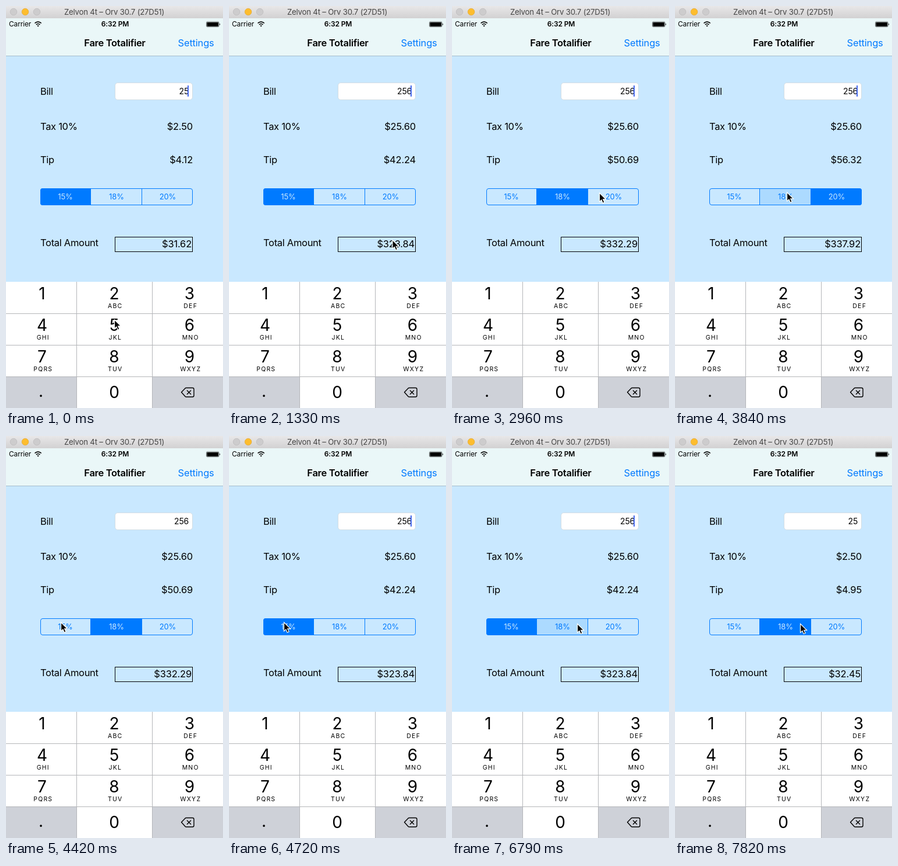
Write an HTML page that moves like this. It is 373 by 688 pixels and loops after 8000 ms.

```html
<!DOCTYPE html>
<html lang="en">
<head>
<meta charset="utf-8">
<title>Fare Totalifier</title>
<style>
  html, body { margin: 0; width: 100%; height: 100%; overflow: hidden; }
  svg { display: block; width: 373px; height: 688px; background: #c9e8ff; }
  text { font: 16.5px Inter, sans-serif; letter-spacing: -.3px; }
  .mid { text-anchor: middle; }
  .end { text-anchor: end; letter-spacing: -.2px; }
  .window { font-size: 13.2px; letter-spacing: -.2px; fill: #444; }
  .status { font-size: 12px; letter-spacing: -.15px; }
  .bold { font-weight: 600; }
  .segment { font-size: 13px; letter-spacing: -.1px; }
  .digit { font-size: 28px; letter-spacing: 0; }
  .letters { font-size: 10.5px; letter-spacing: 1.2px; }
</style>
</head>
<body>
<svg viewBox="0 0 373 688">
  <defs>
    <linearGradient id="chrome" x2="0" y2="1">
      <stop stop-color="#e8e7e8"/><stop offset="1" stop-color="#d2d1d2"/>
    </linearGradient>
    <clipPath id="pill"><rect x="59" y="312" width="262" height="29" rx="4"/></clipPath>
  </defs>

  <rect y="20" width="373" height="65" fill="#eaf7f8"/>
  <path d="M0 85.5H373" stroke="#a5bccb"/>
  <rect width="373" height="21" fill="url(#chrome)"/>
  <g stroke-width=".6">
    <circle cx="13" cy="10" r="5.8" fill="#cdcccd" stroke="#b5b4b5"/>
    <circle cx="33" cy="10" r="5.8" fill="#fdbd2e" stroke="#dfa023"/>
    <circle cx="53" cy="10" r="5.8" fill="#cdcccd" stroke="#b5b4b5"/>
  </g>
  <text class="window mid" x="186" y="15">Zelvon 4t – Orv 30.7 (27D51)</text>

  <text class="status" x="5" y="35">Carrier</text>
  <g fill="none" stroke="#000" stroke-width="1.7">
    <path d="M49.5 29.5a8 8 0 0 1 11.2 0M51.8 32a4.8 4.8 0 0 1 6.6 0"/>
    <path d="M55.1 35.6l-1.7-1.8a2.4 2.4 0 0 1 3.4 0z" fill="#000" stroke="none"/>
  </g>
  <text class="status bold mid" x="187.5" y="35">6:32 PM</text>
  <rect x="344.5" y="27" width="21.5" height="8.6" rx="1.6" fill="none" stroke="#000" stroke-width=".6"/>
  <rect x="345.4" y="27.9" width="19.7" height="6.8" rx=".8"/>
  <path d="M367 29.7q2 1.6 0 3.2z"/>

  <text class="bold mid" x="187" y="69">Fare Totalifier</text>
  <text class="end" x="357.6" y="69" fill="#007aff">Settings</text>

  <text x="59" y="152">Bill</text>
  <text x="59" y="212">Tax 10%</text>
  <text x="59" y="269">Tip</text>
  <text x="59" y="411">Total Amount</text>
  <rect x="187.5" y="131.5" width="133" height="29" rx="4.5" fill="#fff" stroke="#d3dde4"/>
  <text class="end" id="bill" x="314" y="151" style="font-size:14px"/>
  <rect id="caret" x="312" y="136" width="2" height="19" fill="#4468ee"/>
  <text class="end" id="tax" x="321" y="212"/>
  <text class="end" id="tip" x="321" y="269"/>
  <rect x="187.5" y="395.5" width="133" height="25" fill="none" stroke="#000"/>
  <text class="end" id="total" x="319" y="413"/>

  <g id="segments" clip-path="url(#pill)"></g>
  <rect x="59.5" y="312.5" width="261" height="28" rx="3.5" fill="none" stroke="#007aff"/>
  <path d="M145.5 312V341M233.5 312V341" stroke="#007aff"/>

  <rect y="472" width="373" height="216" fill="#fff"/>
  <path d="M0 634.5H121.5V688H0zM251.5 634.5H373V688H251.5z" fill="#ced1d8"/>
  <path d="M0 526.5H373M0 580.5H373M0 634.5H373M121.5 472V688M251.5 472V688" stroke="#b4b6b9"/>
  <g id="keys"></g>
  <g fill="none" stroke="#000" stroke-width="1.4" stroke-linejoin="round">
    <path d="M301.5 661L308 654.2Q308.7 653.5 309.8 653.5H320.5Q323 653.5 323 656V666.5Q323 669 320.5 669H309.8Q308.7 669 308 668.2Z"/>
    <path d="M311 657.8l7 7M318 657.8l-7 7"/>
  </g>

  <path id="cursor" d="M0 0V15L3.4 11.9L5.7 17.2L8.5 16L6.2 10.8H11Z" stroke="#fff" stroke-width="1.2"/>
</svg>
<script>
const LOOP = 8000, STEP = 147, BLINK = 6;
const $ = id => document.getElementById(id);

const letters = ["", "ABC", "DEF", "GHI", "JKL", "MNO", "PQRS", "TUV", "WXYZ"];
const key = (label, x, y) => `<text class="digit mid" x="${x}" y="${y}">${label}</text>`;
$("keys").innerHTML = letters.map((word, i) => {
  const x = 62 + 126.7 * (i % 3) - (i % 3 === 1 ? 2.7 : 0);
  const y = 502 + 54 * Math.floor(i / 3);
  return key(i + 1, x, y) + `<text class="letters mid" x="${x + 1.8}" y="${y + 15}">${word}</text>`;
}).join("") + key(".", 60, 669) + key(0, 186, 671);

const rates = [15, 18, 20];
$("segments").innerHTML = rates.map((rate, i) =>
  `<rect x="${57.5 + 88 * i}" y="312" width="88" height="29"/>
   <text class="segment mid" x="${102 + 88 * i}" y="331">${rate}%</text>`).join("");
const boxes = document.querySelectorAll("#segments rect");
const captions = document.querySelectorAll("#segments text");

const start = { x: 186.5, y: 537 };
const moves = [
  { from: 1, to: 4, x: 300, y: 541 },
  { from: 8, to: 9, x: 281, y: 400.5 },
  { from: 9, to: 13, x: 197, y: 320 },
  { from: 18, to: 20, x: 253.5, y: 320 },
  { from: 23, to: 26, x: 192.5, y: 319 },
  { from: 27, to: 29, x: 94.5, y: 319 },
  { from: 41, to: 44, x: 215.5, y: 321.5 }
];
const taps = [
  { at: 0, segment: 0 }, { at: 17, segment: 1 }, { at: 23, segment: 2 },
  { at: 27, segment: 1 }, { at: 32, segment: 0 }, { at: 47, segment: 1 }
];
const typed = 6, erased = 48;
const blinkStarts = [-2, typed, 32, erased];

const clamp = v => Math.min(1, Math.max(0, v));
const ease = t => Math.sin(clamp(t) * Math.PI / 2);
const money = value => "$" + (value - 1e-9).toFixed(2);
const segmentAt = step => taps.findLast(tap => tap.at <= step).segment;

function pointerAt(step) {
  return moves.reduce((p, move) => {
    const t = ease((step - move.from) / (move.to - move.from));
    return { x: p.x + (move.x - p.x) * t, y: p.y + (move.y - p.y) * t };
  }, start);
}

function caretOpacity(step) {
  const age = step - blinkStarts.findLast(s => s <= step);
  if (age < 4) return 1;
  const fromDark = Math.abs((age + 3.5) % BLINK - BLINK / 2);
  return clamp(fromDark - 1);
}

function draw(time) {
  const step = Math.floor(time % LOOP / STEP);
  const chosen = segmentAt(step);
  const pressed = segmentAt(step + 1);
  const bill = step >= typed && step < erased ? 256 : 25;
  const tax = bill * 0.1;
  const tip = (bill + tax) * rates[chosen] / 100;

  $("bill").textContent = bill;
  $("tax").textContent = money(tax);
  $("tip").textContent = money(tip);
  $("total").textContent = money(bill + tax + tip);
  $("caret").setAttribute("opacity", caretOpacity(step));
  boxes.forEach((box, i) => {
    box.setAttribute("fill", i === chosen ? "#007aff" : i === pressed ? "#acdaff" : "none");
    captions[i].setAttribute("fill", i === chosen ? "#c9e8ff" : "#007aff");
  });

  const { x, y } = pointerAt(step);
  $("cursor").setAttribute("transform", `translate(${x} ${y})`);
}

function tick() {
  draw(performance.now());
  requestAnimationFrame(tick);
}
tick();
</script>
</body>
</html>
```
